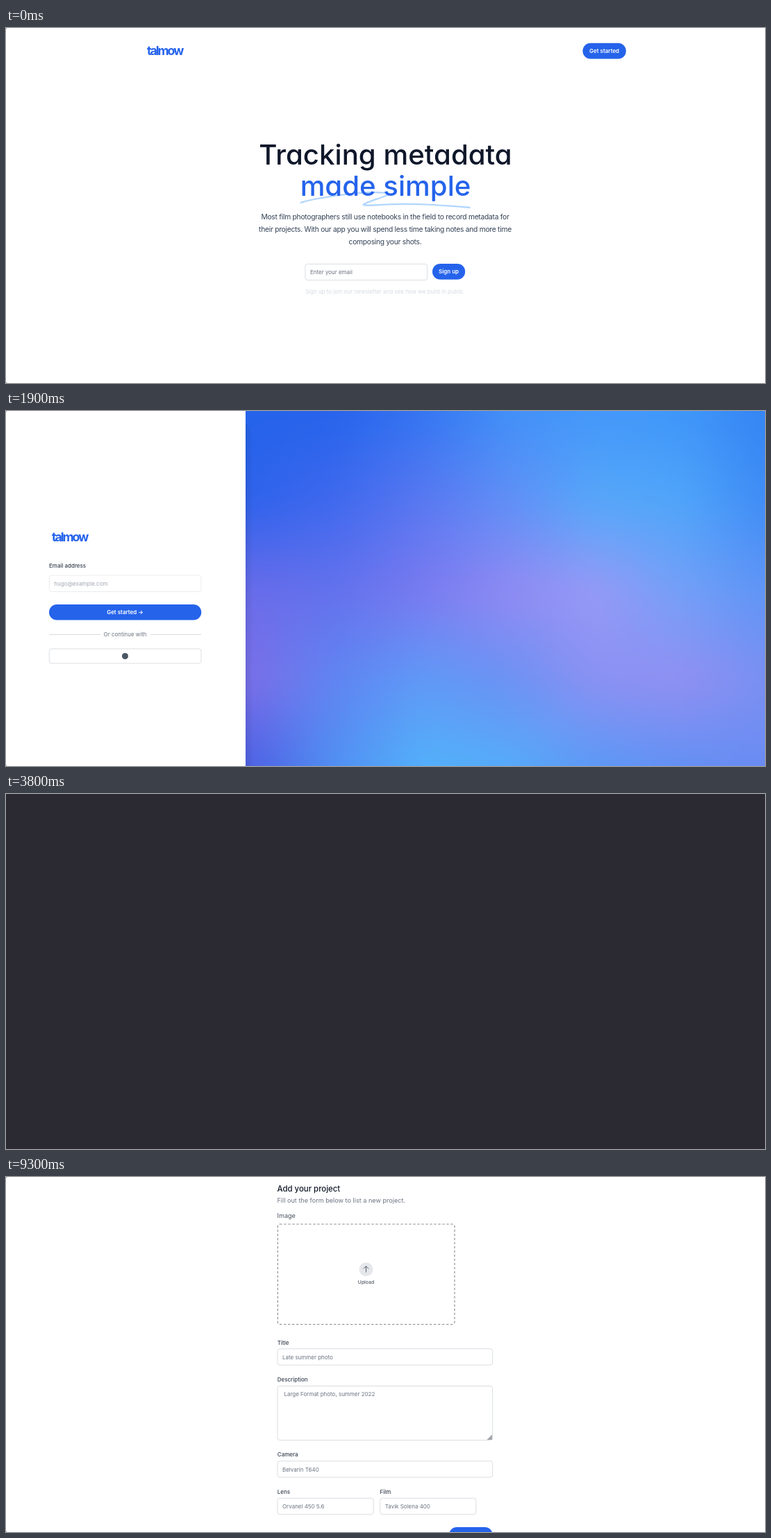
Write an HTML page with a canvas that moves like this. It is 1093 px wide and 512 px high and loops after 10000 ms.

```html
<!DOCTYPE html>
<html lang="en">
<head>
<meta charset="utf-8">
<title>Sign-up walkthrough</title>
<style>
  html, body { margin: 0; width: 100%; height: 100%; overflow: hidden; background: #fff; }
  svg { position: absolute; left: 0; top: 0; }
  #panel { position: absolute; left: 345px; top: 0; width: 748px; height: 512px; overflow: hidden; }
  #panel canvas { position: absolute; left: -62.3px; top: -64px; width: 872.7px; height: 640px; filter: blur(22px); }
  text { font: 400 7.97px Inter, sans-serif; font-optical-sizing: none; fill: #6b7280; }
  .mid { text-anchor: middle; }
  .logo { font-size: 17.8px; font-weight: 700; letter-spacing: -2.1px; fill: #2563eb; }
  .title { font-size: 40.2px; font-weight: 500; font-feature-settings: "cv11"; fill: #0f172a; }
  .lead { font-size: 10.25px; letter-spacing: -.025em; fill: #334155; }
  .label { font-weight: 500; fill: #374151; }
  .action { font-weight: 600; fill: #fff; text-anchor: middle; }
  .medium { font-size: 9.11px; }
  .button { fill: #2563eb; rx: 11.3px; }
  .field { fill: #fff; stroke: #d1d5db; stroke-width: .8; rx: 3.4px; }
  #toast { transform-box: fill-box; transform-origin: center; }
  #toast > rect { fill: #fff; rx: 4.5px; filter: drop-shadow(0 1.7px 2.8px rgba(0, 0, 0, .12)); }
</style>
</head>
<body>
<div id="panel"><canvas width="7" height="5"></canvas></div>
<svg width="1093" height="512" viewBox="0 0 1093 512">
  <defs>
    <linearGradient id="shade">
      <stop stop-color="#000" stop-opacity=".08"/>
      <stop offset="1" stop-color="#000" stop-opacity=".01"/>
    </linearGradient>
  </defs>
  <path d="M0 0H1.5L0 1.5ZM0 512H1.5L0 510.5Z" fill="#888"/>

  <g id="home">
    <text class="logo" x="203" y="39">talmow</text>
    <rect class="button" x="830.5" y="21.8" width="62.3" height="22.7"/>
    <text class="action" x="861.6" y="36">Get started</text>
    <path transform="translate(423.5 235.5) scale(.587)" fill="none" stroke="#b3d6fd" stroke-width="4" stroke-linecap="round"
      d="M2 28C20 21 60 15 90 10.500Q160 0 205 3.500Q226 6 210 11C196 17 166 25 156 32Q152 35 175 34.500C260 28 320 32 416 40"/>
    <text class="title mid" x="546.5" y="197">Tracking metadata</text>
    <text class="title mid" x="546.5" y="242.300" style="fill:#2563eb">made simple</text>
    <text class="lead mid" x="546" y="275.5">Most film photographers still use notebooks in the field to record metadata for</text>
    <text class="lead mid" x="546" y="293.7">their projects. With our app you will spend less time taking notes and more time</text>
    <text class="lead mid" x="546" y="311.9">composing your shots.</text>
    <rect class="field" x="431" y="340.4" width="175.6" height="23.2"/>
    <text x="438" y="354.8">Enter your email</text>
    <rect class="button" x="614" y="340" width="47.2" height="22.8"/>
    <text class="action" x="637.5" y="354.3">Sign up</text>
    <text x="431" y="382.800" style="fill:#d5dae1">Sign up to join our newsletter and see how we build in public.</text>
  </g>

  <g id="signin">
    <path d="M345 17Q355 27 355 50V512H345Z" fill="url(#shade)"/>
    <text class="logo" x="66" y="188">talmow</text>
    <text class="label" x="62" y="226">Email address</text>
    <rect class="field" x="62.3" y="237" width="218.700" height="23.5" style="stroke:#e5e7eb"/>
    <text x="69.3" y="251.700" style="fill:#a1a7b1">hugo@example.com</text>
    <rect class="button" x="62" y="279" width="219.300" height="22.600"/>
    <text class="action" id="submit" x="171.5" y="293.2">Get started →</text>
    <path d="M62 322.300H136M208 322.300H281" stroke="#d1d5db" stroke-width=".9"/>
    <text class="mid" x="171.600" y="325.200">Or continue with</text>
    <rect class="field" x="62.3" y="343" width="218.700" height="21"/>
    <circle cx="171.500" cy="353.500" r="4.500" fill="#4b5563"/>
  </g>

  <g id="toast">
    <rect x="500.5" y="8" width="90.800" height="25.600"/>
    <g fill="none" stroke-width="1.1">
      <circle cx="512" cy="20.500" r="3" stroke="#e0e0e0"/>
      <path id="spinner" d="M514.100 18.400A3 3 0 0 1 514.100 22.600" stroke="#616161"/>
    </g>
    <text class="medium" x="523" y="24" style="fill:#363636">Redirecting…</text>
  </g>

  <rect id="dark" width="1093" height="512" fill="#2b2a33"/>

  <g id="project">
    <text x="390.500" y="21.300" style="font-size:11.4px;font-weight:500;fill:#111827">Add your project</text>
    <text class="medium" x="390.500" y="36.500">Fill out the form below to list a new project.</text>
    <text class="medium" x="390.500" y="59.400" style="fill:#4b5563">Image</text>
    <rect id="drop" x="391.300" y="68" width="254.700" height="144.500" rx="3" fill="none" stroke-width="1.14" stroke-dasharray="3.4 2.6"/>
    <circle cx="518.500" cy="133.200" r="10" fill="#e5e7eb"/>
    <path d="M518.500 137.500V128.700M514.800 132.400L518.500 128.700L522.200 132.400" fill="none" stroke="#4b5563" stroke-width=".9"/>
    <text class="mid" x="518.500" y="154.300" style="font-size:6.83px;font-weight:500;fill:#4b5563">Upload</text>

    <text class="label" x="390.800" y="241.500">Title</text>
    <rect class="field" x="391" y="247.800" width="309.700" height="23.400"/>
    <text x="398" y="262.500">Late summer photo</text>

    <text class="label" x="390.800" y="295">Description</text>
    <rect class="field" x="391" y="301.500" width="309.700" height="78"/>
    <text x="400.500" y="316.200">Large Format photo, summer 2022</text>
    <path d="M700 371.500V379H692.500Z" fill="#a3a5aa"/>

    <text class="label" x="390.800" y="403.300">Camera</text>
    <rect class="field" x="391" y="409.700" width="309.700" height="23.400"/>
    <text x="398" y="424.500">Belvarin T640</text>

    <text class="label" x="390.800" y="457">Lens</text>
    <rect class="field" x="391" y="463.200" width="138.200" height="23.400"/>
    <text x="398" y="478.200">Orvanel 450 5.6</text>
    <text class="label" x="538.500" y="457">Film</text>
    <rect class="field" x="538.700" y="463.200" width="138.200" height="23.400"/>
    <text x="545.800" y="478.200">Tavik Solena 400</text>
    <rect class="button" x="638" y="505" width="62.800" height="22.800"/>
  </g>
</svg>
<script>
  const LOOP = 10000, STEP = 100;
  const TOAST_START = 3050, TOAST_ENTER = 350;
  const el = id => document.getElementById(id);
  const clamp = v => Math.min(1, Math.max(0, v));

  // Coarse colour mesh, smoothed by scaling and blur.
  const mesh = [
    '2563eb 2764ec 3575f2 4290f8 4598fa 4097f9 3584f4',
    '2f63ec 4069ee 5a78f1 628ff6 57a8fa 50a6fa 3f8cf6',
    '6a6cea 6472ed 7a7af0 918af3 989af6 74a0f8 5f95f6',
    '7c6fe8 6085f2 5f9af7 6b92f4 8b91f3 9290f2 7a90f3',
    '4b60e4 5091f3 53b2fb 55adfa 5b99f6 6290f4 6a8cf3'
  ];
  const ctx = document.querySelector('canvas').getContext('2d');
  mesh.forEach((row, y) => row.split(' ').forEach((colour, x) => {
    ctx.fillStyle = '#' + colour;
    ctx.fillRect(x, y, 1, 1);
  }));

  // Visible time span of each part, in ms.
  const spans = {
    home: [0, 1500], signin: [1500, 3800], panel: [1900, 3800], submit: [1900, 3800],
    toast: [3100, 3800], dark: [3800, 6300], project: [8600, LOOP]
  };

  function render(t) {
    for (const [id, [from, to]] of Object.entries(spans))
      el(id).style.display = t >= from && t < to ? '' : 'none';

    const age = t - TOAST_START;
    const rest = (1 - clamp(age / TOAST_ENTER)) ** 3;
    el('toast').style.transform = `translateY(${-51 * rest}px) scale(${1 - .4 * rest})`;
    el('toast').style.opacity = 1 - .5 * rest;
    el('spinner').setAttribute('transform', `rotate(${age * .36} 512 20.5)`);

    const hover = clamp((t - 9100) / 200);
    const mix = (a, b) => Math.round(a + (b - a) * hover);
    el('drop').setAttribute('stroke', `rgb(${mix(209, 138)},${mix(213, 139)},${mix(219, 146)})`);
  }

  function tick() {
    const t = performance.now() % LOOP;
    render(Math.floor(t / STEP) * STEP);
    requestAnimationFrame(tick);
  }
  tick();
</script>
</body>
</html>
```
